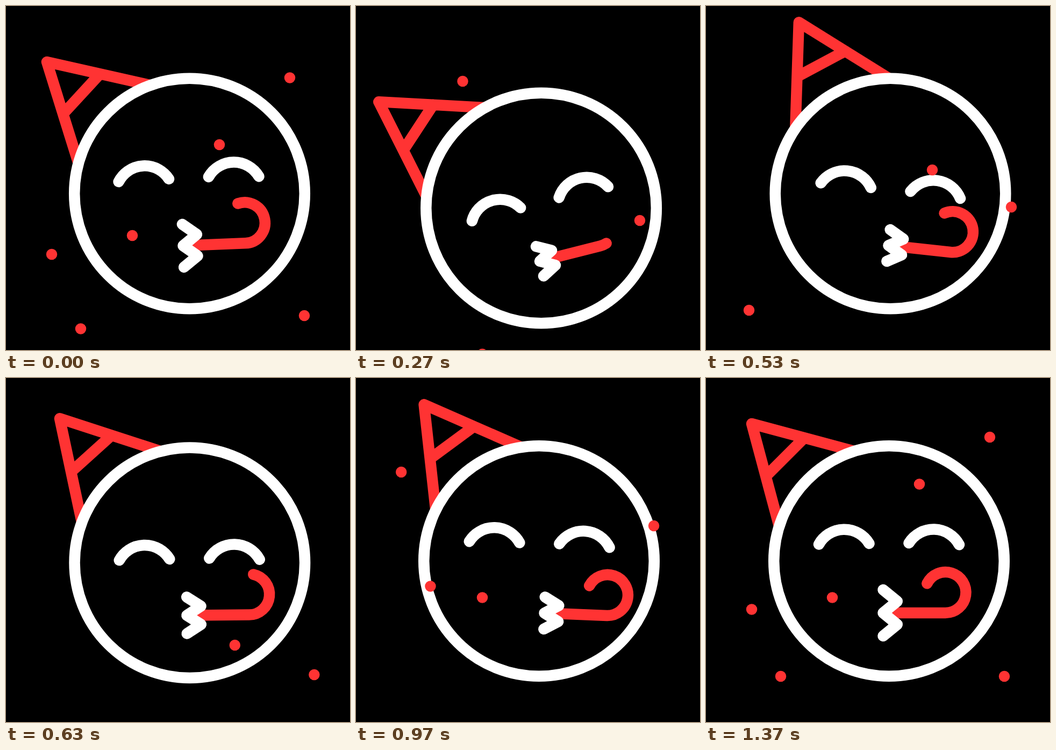
These frames come from a looping animation (640 px wide and 640 px high, 1.67 s). An HTML page:

```html
<!DOCTYPE html>
<html lang="en">
<head>
<meta charset="utf-8">
<title>Party face</title>
<style>
  html, body { margin: 0; width: 100%; height: 100%; overflow: hidden; background: #000; }
  svg { display: block; width: 100%; height: 100%; }
  .line { fill: none; stroke-width: 20.5; stroke-linecap: round; stroke-linejoin: round; }
  .red { stroke: #f33; }
  .white { stroke: #fff; }
  #dots { fill: #f33; }
</style>
</head>
<body>
<svg viewBox="0 0 640 640">
  <path id="hat" class="line red"/>
  <circle id="head" class="line white" r="214.3"/>
  <path id="eyes" class="line white" d="M-130.5 .8A54 54 0 0 1 -37 -.6M37 -1.5A54 54 0 0 1 130.5 1.5"/>
  <g id="mouth">
    <path id="horn" class="line red"/>
    <path id="lips" class="line white"/>
  </g>
  <g id="dots"></g>
</svg>
<script>
const LOOP = 1670, STEP = 33.34, LAST = 41;
const $ = id => document.getElementById(id);
const set = (el, attrs) => { for (const k in attrs) el.setAttribute(k, attrs[k]); };

// Pose values at these steps; a smooth curve joins them.
const KEYS = [-1, 0, 4, 11, 16, 23, 29, LAST];
const POSE = {
  hat:   [0, -2.3, -10.5, -8.3, 16.9, -17.7, 8.7, 0],
  headX: [0, 1, 3.5, 4, 2.5, 0, 0, 0],
  headY: [0, 8.5, 35.5, 29.5, 8.5, 0, 0, 0],
  tilt:  [0, -2.3, -10.8, -13, 6.2, -11.6, 2.3, 0],
  eyesX: [0, -.5, .6, 2.4, 3, -2, .75, 0],
  eyesY: [0, 12.3, 52.5, 54.9, 33.9, 22.3, 0, 0],
  lipsX: [0, 0, .75, 19.25, 10, 6.5, 21, 0],
  lipsY: [0, 9, 39.25, 30.5, 8.5, 3, .25, 0],
  pout:  [1, .93, .776, .608, .69, .887, .693, 1],
  curl:  [244, 197, 29, 52, 210, 97, 245, 244]
};

// Confetti: resting x, y; first fall offset, speed; return height at step 29, speed.
const CONFETTI = [
  [85, 430.5, 31.5, 33.75, 175, 50],
  [139, 555, 45.5, 47, 387.5, 58.4],
  [235, 408.5, 18.5, 19.6, 413, 70],
  [397, 197.5, 60.5, 59.1, -12, 30],
  [528, 110, 23.5, 25.2, -12, 14],
  [555, 555, 21, 20, 275, 46.8]
];
// Passing confetti: x, y at step 11 and speed in x, y.
const SHOWER = [
  [41, -5, 7.8, 114.2],
  [112, 174, 5, 100],
  [210.5, 335, 4, 65],
  [413, -15, 1.6, 64],
  [559, 77.5, 1.8, 59.3]
];

function curve(vals, f) {
  const n = KEYS.length - 1;
  if (f >= KEYS[n]) return vals[n];
  let i = 0;
  while (f >= KEYS[i + 1]) i++;
  const slope = k => k === 0 || k === n ? 0 :
    (vals[k + 1] - vals[k - 1]) / (KEYS[k + 1] - KEYS[k - 1]);
  const h = KEYS[i + 1] - KEYS[i], u = (f - KEYS[i]) / h, w = 1 - u;
  return vals[i] * (1 + 2 * u) * w * w + vals[i + 1] * (3 - 2 * u) * u * u +
    h * u * w * (slope(i) * w - slope(i + 1) * u);
}

function hatPath() {
  const at = s => [-255.5 + s, -255.5 + .268 * s];
  const flip = ([x, y]) => [y, x];
  const end = at(189), bar = at(98);
  return `M${flip(end)}L${at(0)}L${end}M${flip(bar)}L${bar}`;
}

function hornPath(deg) {
  const r = 38, cx = 116, a = (90 - deg) * Math.PI / 180;
  const x = cx + r * Math.cos(a), y = -r + r * Math.sin(a);
  return `M12 0H${cx}A${r} ${r} 0 ${deg > 180 ? 1 : 0} 0 ${x} ${y}`;
}

function lipsPath(s) {
  return 'M' + [-2, -1, 0, 1, 2].map(k => [k % 2 ? 26.3 : 0, k * 21.5 * s]).join('L');
}

function dotPlaces(f) {
  const places = [];
  for (const [x, y, d, v, y3, v3] of CONFETTI) {
    const back = Math.min(y, y3 + v3 * (f - 29));
    places.push([x, y + d + v * f + f * f], [x - (y - back) / 300, back]);
  }
  for (const [x, y, vx, vy] of SHOWER) places.push([x + vx * (f - 11), y + vy * (f - 11)]);
  return places;
}

const dots = dotPlaces(0).map(() => {
  const c = document.createElementNS('http://www.w3.org/2000/svg', 'circle');
  c.setAttribute('r', 10.25);
  return $('dots').appendChild(c);
});
$('hat').setAttribute('d', hatPath());

function draw(f) {
  const p = {};
  for (const k in POSE) p[k] = curve(POSE[k], f);
  const place = (x, y, deg) => ({ transform: `translate(${x} ${y}) rotate(${deg})` });
  const hx = 340.5 + p.headX, hy = 340.5 + p.headY;
  set($('hat'), place(hx, hy, p.hat));
  set($('head'), { cx: hx, cy: hy });
  set($('eyes'), place(340.5 + p.eyesX, 308.6 + p.eyesY, p.tilt));
  set($('mouth'), place(329.5 + p.lipsX, 437 + p.lipsY, p.tilt));
  set($('horn'), { d: hornPath(Math.max(5, Math.min(245, p.curl))) });
  set($('lips'), { d: lipsPath(p.pout) });
  dotPlaces(f).forEach(([cx, cy], i) => set(dots[i], { cx, cy }));
}

const start = performance.now();
function tick() {
  const t = (performance.now() - start) % LOOP;
  draw(Math.floor((t + 5) / STEP));
  requestAnimationFrame(tick);
}
tick();
</script>
</body>
</html>
```
